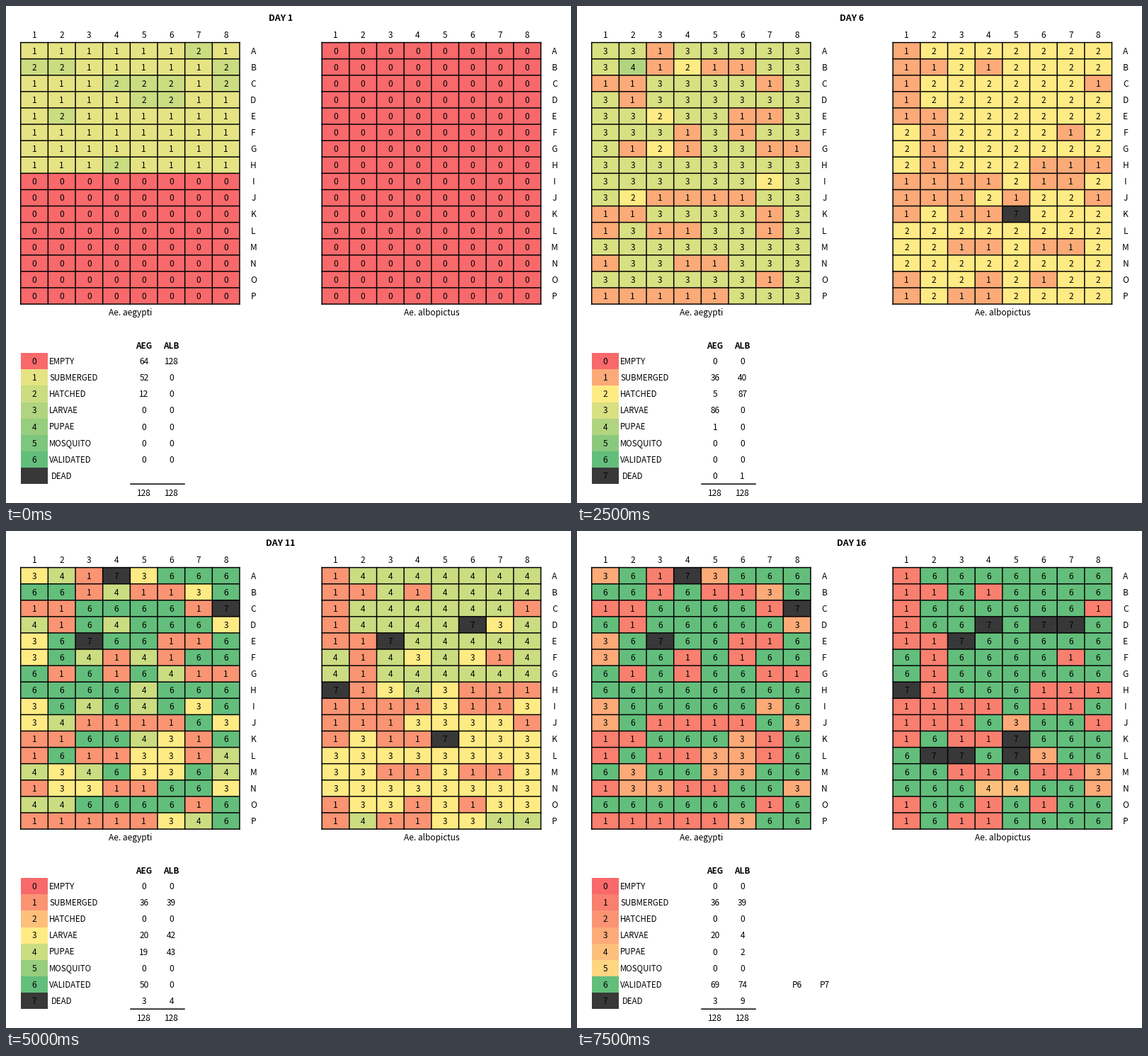
A matplotlib script for the animation above (8 s loop, 798 by 702 pixels).

```python
import numpy as np
import matplotlib.pyplot as plt
from matplotlib.animation import FuncAnimation
from matplotlib.collections import LineCollection, PolyCollection

WIDTH, HEIGHT, DPI = 798, 702, 100
DAYS, DEAD = 16, 7
ROWS = "ABCDEFGHIJKLMNOP"
CELL_W, CELL_H = 38.66, 23.09
GRID_TOP, LEGEND_TOP = 51.6, 490.3
STAGES = ["EMPTY", "SUBMERGED", "HATCHED", "LARVAE", "PUPAE",
          "MOSQUITO", "VALIDATED", "DEAD"]
RED, YELLOW, GREEN, DARK = (np.array(c) / 255 for c in (
    (248, 105, 107), (255, 235, 132), (99, 190, 123), (56, 56, 56)))


def cells(spec):
    """Index arrays for wells written as a row letter plus its columns."""
    pairs = [(ROWS.index(word[0]), int(col) - 1)
             for word in spec.split() for col in word[1:]]
    return tuple(np.array(pairs).T)


class Tray:
    """Wells move between observed days; duds never hatch."""

    def __init__(self, left, first_day, duds, deaths, observed, seed):
        self.left = left
        self.deaths = deaths
        self.start = np.where(np.arange(16) < 8, first_day, first_day + 1)[:, None]
        self.jitter = np.random.default_rng(seed).uniform(-0.5, 0.5, (16, 8))
        self.keys = {}
        for day, (usual, others) in observed.items():
            grid = np.full((16, 8), usual)
            for stage, spec in others.items():
                grid[cells(spec)] = stage
            grid[cells(duds)] = 1
            self.keys[day] = grid

    def on(self, day):
        before = max([d for d in self.keys if d <= day], default=min(self.keys))
        after = min([d for d in self.keys if d >= day], default=max(self.keys))
        a, b = self.keys[before], self.keys[after]
        grid = a.copy()
        if before < day < after:
            part = (day - before) / (after - before)
            grid = np.floor(a + (b - a) * part + 0.5 + self.jitter).astype(int)
            grid = np.clip(grid, np.minimum(a, b), np.maximum(a, b))
        grid = np.where(day < self.start, 0, grid)
        for death_day, spec in self.deaths.items():
            if day >= death_day:
                grid[cells(spec)] = DEAD
        return grid


STALLED = "A15 B7 D8 E1 F1 I17 J18 K6 L56 M256 N238 P6"

aegypti = Tray(
    20.7, 1,
    "A3 B356 C127 D2 E67 F46 G2478 J3456 K127 L1347 N145 O7 P12345",
    {10: "A4 E3", 11: "C8"},
    {1: (1, {2: "A7 B128 C4568 D56 E2 H4"}),
     3: (2, {1: "A46 B4 F3 H5 I7 J2 K58 M138 O128 P6",
             3: "A12578 B128 C34568 D135678 E2458 F1278 G56 H234678"}),
     6: (3, {2: "B4 E3 G3 I7 J2", 4: "B2"}),
     9: (4, {3: "A12456 B47 C8 D18 E13 F1 G6 H5 I137 J18 K56 L568 M1256 "
                "N238 O1 P67",
             5: "C34 E8 F7 H68", 6: "A78 B128 D7 E24 H7"}),
     11: (6, {3: STALLED,
              4: "A2 B4 D14 F35 G6 H5 I35 J2 K5 L8 M138 O12 P7"}),
     14: (6, {3: STALLED})},
    seed=3)

albopictus = Tray(
    446.2, 3,
    "A1 B124 C18 D1 E12 F27 G2 H2678 I123467 J1238 K134 M3467 O146 P134",
    {6: "K5", 7: "H1", 8: "E3", 11: "D6", 12: "L2", 13: "D4 L5", 14: "D7 L3"},
    {3: (1, {}),
     6: (2, {1: "J5"}),
     7: (3, {1: "J5"}),
     9: (3, {2: "J5"}),
     11: (4, {3: "D7 F46 H35 I58 J4567 K2678 L12345678 M1258 N12345678 "
                 "O23578 P56"}),
     14: (6, {3: "J6 L6 M8 N8", 4: "I58 J457 K278 L147 N1234567 O8 P56"}),
     16: (6, {3: "J5 L6 M8 N8", 4: "N45"})},
    seed=8)

TRAYS = (aegypti, albopictus)


def shade(stage, middle):
    """Three-colour scale: red at 0, yellow at the median, green at 6."""
    if stage == DEAD:
        return DARK
    if stage <= 0:
        return RED
    if stage >= 6:
        return GREEN
    if stage <= middle:
        return RED + (YELLOW - RED) * stage / middle
    return YELLOW + (GREEN - YELLOW) * (stage - middle) / (6 - middle)


plt.rcParams["font.family"] = "Noto Sans CJK JP"
fig = plt.figure(figsize=(WIDTH / DPI, HEIGHT / DPI), dpi=DPI, facecolor="white")
ax = fig.add_axes([0, 0, 1, 1])
ax.set(xlim=(0, WIDTH), ylim=(HEIGHT, 0))
ax.axis("off")


def label(x, y, text="", size=11.9, ha="center", weight="normal"):
    """Text with the middle of its capitals at y; size in pixels."""
    return ax.text(x, y + 0.367 * size, text, fontsize=size * 72 / DPI, ha=ha,
                   va="baseline", weight=weight, color="black")


def boxes(left, top, rows, cols):
    polys = []
    for r in range(rows):
        for c in range(cols):
            x0, x1 = left + c * CELL_W, left + (c + 1) * CELL_W
            y0, y1 = top + r * CELL_H, top + (r + 1) * CELL_H
            polys.append([(x0, y0), (x1, y0), (x1, y1), (x0, y1)])
    patches = PolyCollection(polys, antialiaseds=False, linewidths=0)
    return ax.add_collection(patches, autolim=False)


def rules(segments):
    lines = LineCollection(segments, colors="black", linewidths=1.5 * 72 / DPI,
                           capstyle="projecting", zorder=2)
    lines.set_snap(False)
    ax.add_collection(lines, autolim=False)


def build_tray(left, caption):
    patches = boxes(left, GRID_TOP, 16, 8)
    right, bottom = left + 8 * CELL_W, GRID_TOP + 16 * CELL_H
    rules([[(left + c * CELL_W, GRID_TOP), (left + c * CELL_W, bottom)]
           for c in range(9)]
          + [[(left, GRID_TOP + r * CELL_H), (right, GRID_TOP + r * CELL_H)]
             for r in range(17)])
    xs = left + (np.arange(8) + 0.5) * CELL_W
    ys = GRID_TOP + (np.arange(16) + 0.5) * CELL_H
    for c, x in enumerate(xs):
        label(x, 40.8, str(c + 1))
    for name, y in zip(ROWS, ys):
        label(right + 19.3, y, name)
    label(left + 4 * CELL_W, 432.5, caption)
    return patches, [label(x, y) for y in ys for x in xs]


views = [build_tray(tray.left, name)
         for tray, name in zip(TRAYS, ("Ae. aegypti", "Ae. albopictus"))]

legend = boxes(20.7, LEGEND_TOP, 8, 1)
legend_y = LEGEND_TOP + (np.arange(8) + 0.5) * CELL_H
for stage, (name, y) in enumerate(zip(STAGES, legend_y)):
    label(64 if stage == DEAD else 61, y, name, size=11.5, ha="left")
keys = [label(40, y, str(stage)) for stage, y in enumerate(legend_y)]
COUNT_X = (195, 233.7)
counts = [[label(x, y) for y in legend_y] for x in COUNT_X]
for x, name in zip(COUNT_X, ("AEG", "ALB")):
    label(x, 479.3, name, weight="bold", size=11.7)
    label(x, 687.7, "128")
rules([[(176, 675.2), (252, 675.2)]])
notes = [label(311, legend_y[6], "P6"), label(350, legend_y[6], "P7")]
title = label(388, 16.7, weight="bold", size=12.4)


def update(frame):
    day = frame + 1
    grids = [tray.on(day) for tray in TRAYS]
    values = np.concatenate([g.ravel() for g in grids] + [np.arange(7)])
    middle = np.median(values[values < DEAD])
    palette = np.array([shade(stage, middle) for stage in range(8)])

    title.set_text(f"DAY {day}")
    legend.set_facecolor(palette)
    show_dead = day >= 3
    keys[DEAD].set_visible(show_dead)
    for grid, (patches, digits), column in zip(grids, views, counts):
        patches.set_facecolor(palette[grid.ravel()])
        for text, stage in zip(digits, grid.ravel()):
            text.set_text(str(stage))
        for stage, text in enumerate(column):
            text.set_text(str(np.count_nonzero(grid == stage)))
        column[DEAD].set_visible(show_dead)
    for note in notes:
        note.set_visible(day == DAYS)
    return []


anim = FuncAnimation(fig, update, frames=DAYS, interval=500, repeat=True,
                     repeat_delay=0, blit=False)
plt.show()
```
